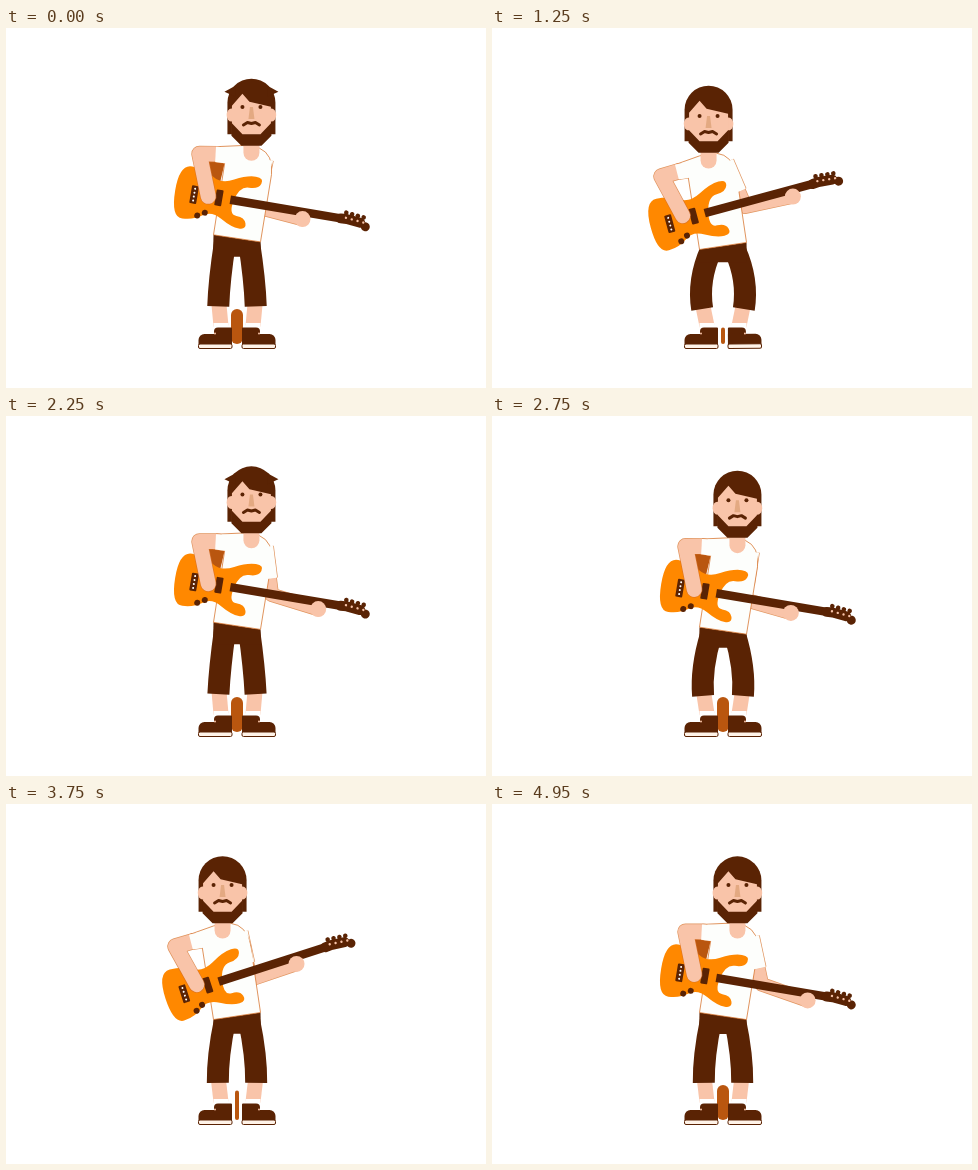
Write an HTML page with a canvas that moves like this. It is 480 px wide and 360 px high and loops after 5000 ms.

```html
<!DOCTYPE html>
<html lang="en">
<head>
<meta charset="utf-8">
<title>Guitar player</title>
<style>
html, body { margin: 0; width: 100%; height: 100%; overflow: hidden; background: #fff; }
canvas { display: block; width: 480px; height: 360px; }
</style>
</head>
<body>
<canvas id="stage" width="480" height="360"></canvas>
<script>
const ctx = document.getElementById('stage').getContext('2d');
const LOOP = 5000, STEP = 50, BEAT = LOOP / 7, BAR = BEAT * 4;
const BROWN = '#5a2304', ORANGE = '#ff8800', SKIN = '#f9c4a9', SHIRT = '#fdfefc';
const RUST = '#b9560f', EDGE = 'rgba(214,112,40,.75)', NOSE = '#e3a982', SOLE = '#fff3e8';
const MIDDLE = 231, WAIST = 209.5;

const mod = (a, n) => ((a % n) + n) % n;
const between = (a, b, k) => a.map((v, i) => v + (b[i] - v) * k);
const wave = (t, period, peak) => Math.cos(2 * Math.PI * (t - peak) / period);
const ease = x => { x = Math.min(1, Math.max(0, x)); return x * x * (3 - 2 * x); };

// bob: 0 standing, 1 knees bent. sway: -1 left, 1 right. reach: fretting hand along the neck.
function poseAt(t) {
  const q = mod(t - 127, BAR);
  return {
    bob: (1 - wave(t, BEAT, 65)) / 2,
    sway: 1 - 2 * ease(q / 560) + 2 * ease((q - 1400) / 560),
    reach: 84 - 13 * wave(t, BAR, 340)
  };
}

function paint(fill, edge) {
  ctx.fillStyle = fill;
  ctx.fill();
  if (edge) { ctx.strokeStyle = edge; ctx.lineWidth = 1; ctx.stroke(); }
}

function polygon(points, fill, edge) {
  ctx.beginPath();
  points.forEach(p => ctx.lineTo(...p));
  ctx.closePath();
  paint(fill, edge);
}

// Closed smooth curve through the middles of the control polygon's sides.
function blob(points, fill) {
  ctx.beginPath();
  ctx.moveTo(...between(points.at(-1), points[0], 0.5));
  points.forEach((p, i) =>
    ctx.quadraticCurveTo(...p, ...between(p, points[(i + 1) % points.length], 0.5)));
  paint(fill);
}

function dot(x, y, r, fill, ry = r) {
  ctx.beginPath();
  ctx.ellipse(x, y, r, ry, 0, 0, 7);
  paint(fill);
}

function box(x, y, w, h, radius, fill, edge) {
  ctx.beginPath();
  ctx.roundRect(x, y, w, h, radius);
  paint(fill, edge);
}

function limb(points, width, color, cap = 'round') {
  ctx.beginPath();
  points.forEach(p => ctx.lineTo(...p));
  ctx.lineCap = cap;
  ctx.lineJoin = 'round';
  ctx.lineWidth = width;
  ctx.strokeStyle = color;
  ctx.stroke();
}

function outlinedLimb(points, width, color, cap) {
  limb(points, width + 1.4, EDGE, cap);
  limb(points, width, color, cap);
}

function within(x, y, angle, draw, flip = 1) {
  ctx.save();
  ctx.translate(x, y);
  ctx.rotate(angle);
  ctx.scale(flip, 1);
  draw();
  ctx.restore();
}

const mirrored = half => [...half, ...half.map(([x, y]) => [-x, y]).reverse()];

// Heel at the origin, toe along +x.
function drawShoe() {
  box(0, -20, 18, 18, [1, 4, 0, 0], BROWN);
  box(0, -13.5, 33.5, 11, [0, 6, 0, 0], BROWN);
  box(0, -3.5, 33.5, 4.5, 1.5, SOLE, BROWN);
  dot(17, -14, 1, SKIN);
}

function drawLegs({ bob, sway }, hipL, hipR) {
  const cuff = 277 + 4 * bob, crotch = 228 + 8 * bob;
  const gap = 4 + 2 * sway, top = 281 + 12 * bob * (1 - sway);
  box(MIDDLE - gap, top, 2 * gap, 316 - top, gap, RUST);

  const tap = -0.23 * ease((bob - 0.75) / 0.22);
  for (const side of [-1, 1]) {
    const x = offset => MIDDLE + side * offset;
    limb([[x(18 + 3 * bob), cuff - 3], [x(16), 298]], 15, SKIN, 'butt');
    limb([[x(16), 295], [x(16), 302]], 15, '#fff', 'butt');
    within(x(5), 319.5, side > 0 ? tap : 0, drawShoe, side);

    ctx.beginPath();
    ctx.moveTo(x(12), WAIST + 11 * bob + 4);
    ctx.quadraticCurveTo(x(17 + 11 * bob), 252, x(18.5 + 3 * bob), cuff + 1);
    ctx.lineWidth = 22;
    ctx.lineCap = 'butt';
    ctx.strokeStyle = BROWN;
    ctx.stroke();
  }
  polygon([hipL, hipR, [MIDDLE + 24, crotch], [MIDDLE - 24, crotch]], BROWN);
}

// Neck starts at the origin and runs along +x.
function drawGuitar() {
  const upper = [[-56, -27], [-30, -26], [-12, -14], [13, -27], [30, -27], [26, -15], [7, -15]];
  const lower = upper.map(([x, y]) => [x - 0.11 * (x + 54), -y]).reverse();
  blob([...upper, ...lower], ORANGE);
  box(-15, -8, 7, 16, 1, BROWN);
  box(-40, -8, 7, 18, 1, BROWN);
  for (let i = 0; i < 4; i++) dot(-36.5, -5 + i * 4, 1, '#fff');
  dot(-30, 21, 3, BROWN);
  dot(-23, 17, 3, BROWN);
  limb([[0, 0], [112, 0]], 8.5, BROWN, 'butt');
  within(112, -1, 0.1, () => {
    limb([[0, 1], [6, 0], [20, 0]], 10, BROWN);
    dot(26, 2.5, 4.5, BROWN);
    for (let i = 0; i < 4; i++) {
      dot(4 + i * 6, -6, 2.3, BROWN);
      dot(5 + i * 6, -1, 1.2, SKIN);
    }
  });
}

function drawHead(x, y, nod, lift) {
  within(x, y, 0, () => {
    box(-24, 0, 48, 55.5, [24, 24, 0, 0], BROWN);
    for (const side of [-1, 1]) {
      if (lift) polygon([[side * 16, 7], [side * (20 + 7 * lift), 13], [side * 16, 18]], BROWN);
      dot(side * 20, 36 + nod, 4.8, SKIN, 6.5);
    }
    polygon([[-19.5, 27], [-9, 15], [-2, 23], [19.5, 28], [19.5, 56], [-19.5, 56]], SKIN);
    polygon(mirrored([[-20, 44], [-20, 57], [-10, 67]]).concat([[9, 55.5], [-9, 55.5]]), BROWN);
    within(0, nod, 0, () => {
      polygon(mirrored([[-1.5, 28], [-3, 40]]), NOSE);
      limb(mirrored([[-8, 46], [-4, 43.5], [0, 44.5]]), 3, BROWN);
      for (const side of [-1, 1]) dot(side * 9, 28, 2, BROWN);
    });
  });
}

// Joint of two bones of equal length, bent down and outward.
function elbowOf(a, b, bone) {
  const dx = b[0] - a[0], dy = b[1] - a[1], d = Math.hypot(dx, dy);
  const h = Math.sqrt(Math.max(0, bone * bone - d * d / 4));
  const [mx, my] = between(a, b, 0.5);
  return [mx - dy / d * h, my + dx / d * h];
}

function draw(t) {
  const pose = poseAt(t), { bob, sway, reach } = pose;
  // The upper body shears sideways above the waist and tips its shoulders.
  const lean = (x, y, drop = 11) =>
    [x + 0.156 * sway * (WAIST - y), y + 0.15 * sway * (x - MIDDLE) + drop * bob];

  ctx.fillStyle = '#fff';
  ctx.fillRect(0, 0, 480, 360);

  const hipL = lean(207.5, WAIST), hipR = lean(254.5, WAIST);
  drawLegs(pose, hipL, hipR);

  const sleeveTop = lean(196.5, 123), sleeveLow = lean(198, 138), armpit = lean(207.5, 138);
  const shoulder = lean(247, 128);
  const guitar = lean(218.5, 172.5, 14);
  const degrees = sway > 0 ? 9.6 * sway : (14 + 5 * (1 - bob)) * sway;
  const angle = (degrees - 2 * (1 - sway * sway)) * Math.PI / 180;
  const cos = Math.cos(angle), sin = Math.sin(angle);
  const fret = [guitar[0] + reach * cos - 7 * sin, guitar[1] + reach * sin + 7 * cos];
  const elbow = elbowOf(shoulder, fret, 48.5);
  const cuff = between(shoulder, elbow, 0.66);

  if (sway > 0) polygon([lean(190, 138), armpit, lean(206, 157), lean(196, 160)], RUST);

  outlinedLimb([between(shoulder, elbow, 0.5), elbow, fret], 13, SKIN);
  outlinedLimb([shoulder, cuff], 15, SHIRT, 'butt');

  ctx.beginPath();
  for (const p of [lean(222, 118), sleeveTop, sleeveLow, armpit, hipL, hipR, lean(255, 142)]) {
    ctx.lineTo(...p);
  }
  ctx.quadraticCurveTo(...lean(254, 122), ...lean(239, 118));
  ctx.closePath();
  paint(SHIRT, EDGE);
  // Hides the seam between body and sleeve.
  limb([shoulder, cuff], 13.5, SHIRT, 'butt');

  const neck = lean(MIDDLE, 117);
  box(neck[0] - 8, neck[1] - 7, 16, 22, [0, 0, 8, 8], SKIN);

  within(...guitar, angle, drawGuitar);
  dot(...fret, 8, SKIN);

  outlinedLimb([lean(199, 130), lean(181.5, 132.5), lean(196.5, 172.5, 13)], 15, SKIN);
  polygon([sleeveTop, sleeveLow, armpit, lean(216, 121)], SHIRT);

  const lift = sway > 0.9 ? ease(1.6 - bob * 8) : 0;
  drawHead(neck[0], 50 + 10 * bob, 3 * bob, lift);
}

function tick(now) {
  draw(Math.floor(mod(now, LOOP) / STEP) * STEP);
  requestAnimationFrame(tick);
}
draw(0);
requestAnimationFrame(tick);
</script>
</body>
</html>
```
